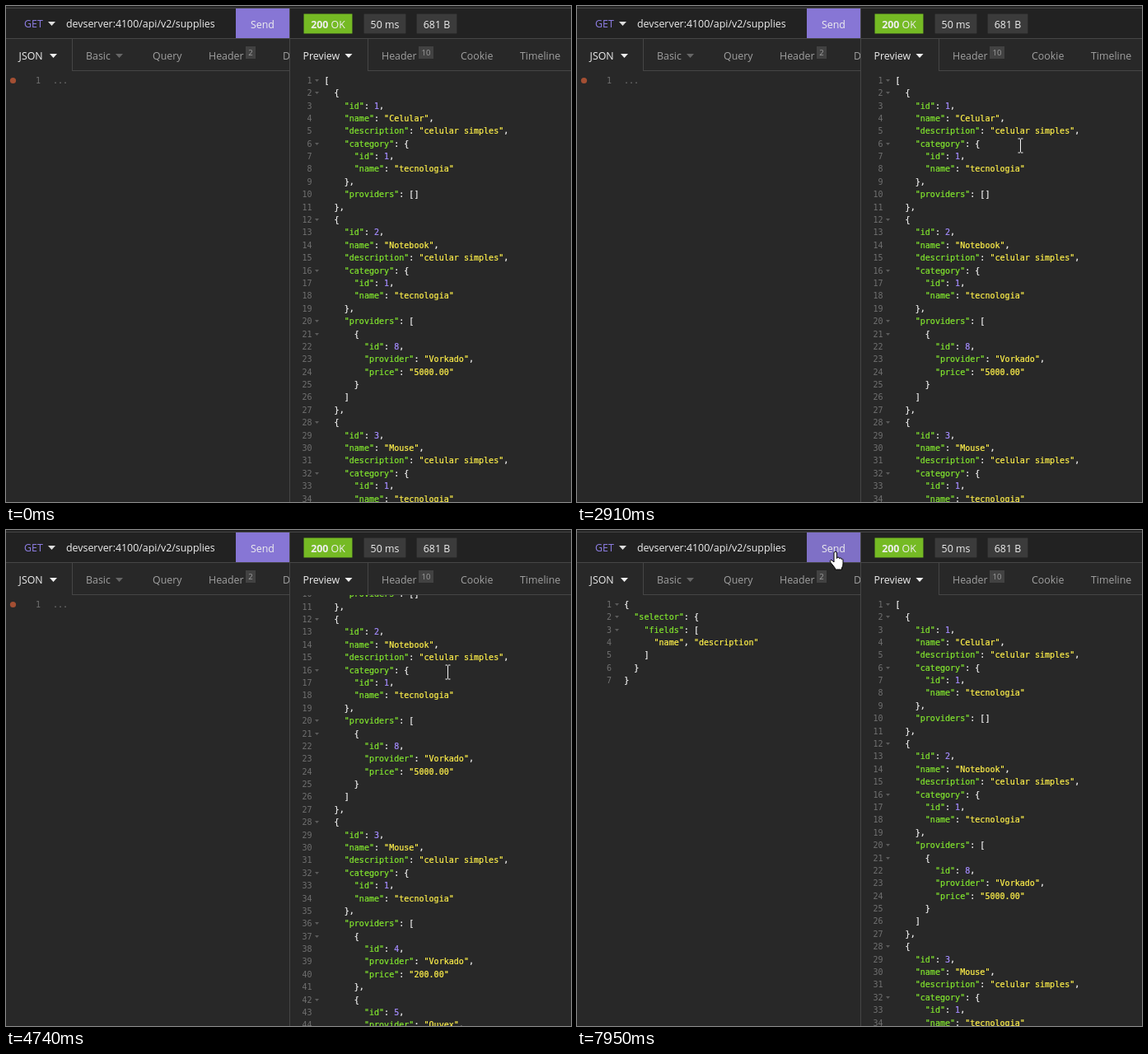
These frames come from a looping animation (686x602 px, 8000 ms). An HTML page:

```html
<!DOCTYPE html>
<html lang="en">
<head>
<meta charset="utf-8">
<style>
  html, body { margin: 0; width: 100%; height: 100%; overflow: hidden; background: #282828; }
  svg { display: block; width: 686px; height: 602px; }
  text { font: 12.4px "Open Sans", "Noto Sans", sans-serif; fill: #eee; white-space: pre; }
  .code { color: #f4f4f4; }
  .code text { font: 10.05px "DejaVu Sans Mono", monospace; fill: currentColor; }
  .code .src, .code tspan { fill: currentColor; stroke: currentColor; stroke-width: .22px; }
  .code .num { fill: #707070; text-anchor: end; }
  .fold { fill: #5c5c5c; }
  .key { color: #82e62e; }
  .str { color: #fff04a; }
  .val { color: #a48cff; }
  .dim { fill: #a0a0a0; }
  .mid { text-anchor: middle; }
  .line { fill: #464646; }
  .tag { fill: #3b3b3b; stroke: #000; stroke-opacity: .07; }
</style>
</head>
<body>
<svg viewBox="0 0 686 602">
  <defs>
    <clipPath id="body"><rect x="346" y="79" width="340" height="523"/></clipPath>
    <clipPath id="tabs"><rect x="81" y="40" width="263" height="38"/></clipPath>
  </defs>
  <rect width="686" height="602" fill="#282828"/>
  <rect width="686" height="39" fill="#222"/>
  <g class="line">
    <rect y="2" width="686" height="1"/>
    <rect y="39" width="686" height="1"/>
    <rect x="344" y="3" width="1" height="599"/>
    <rect x="80" y="40" width="1" height="38"/>
    <rect x="80" y="78" width="264" height="1"/>
    <rect x="439" y="40" width="1" height="38"/>
    <rect x="439" y="78" width="247" height="1"/>
  </g>

  <text x="22" y="26" style="fill:#8f7fe6">GET</text>
  <path d="M51 19h9l-4.5 5z" fill="#ddd"/>
  <text x="73" y="26">devserver:4100/api/v2/supplies</text>
  <rect id="send" x="279" y="3" width="65" height="36"/>
  <text x="311.5" y="27" class="mid">Send</text>

  <rect x="361.5" y="9.5" width="59" height="24" class="tag" style="fill:#75ba24"/>
  <text x="391" y="27" class="mid"><tspan font-weight="700">200</tspan> OK</text>
  <rect x="434.5" y="9.5" width="51" height="24" class="tag"/>
  <text x="460" y="27" class="mid">50 ms</text>
  <rect x="498.5" y="9.5" width="49" height="24" class="tag"/>
  <text x="523" y="27" class="mid">681 B</text>

  <text x="15.6" y="65">JSON</text>
  <path d="M53 58h9l-4.5 5z" fill="#eee"/>
  <g clip-path="url(#tabs)">
    <text x="97" y="65" class="dim">Basic</text>
    <path d="M133 58h9l-4.5 5z" fill="#666"/>
    <text x="178" y="65" class="dim">Query</text>
    <text x="246" y="65" class="dim">Header</text>
    <rect x="291" y="49" width="12" height="15" fill="#424242"/>
    <text x="297" y="60" class="mid dim" style="font-size:9.5px">2</text>
    <text x="336" y="65" class="dim">Docs</text>
  </g>
  <text x="360.5" y="65">Preview</text>
  <path d="M411.5 58h9l-4.5 5z" fill="#eee"/>
  <text x="456" y="65" class="dim">Header</text>
  <rect x="501" y="49" width="18" height="15" fill="#424242"/>
  <text x="510" y="60" class="mid dim" style="font-size:9.5px">10</text>
  <text x="552" y="65" class="dim">Cookie</text>
  <text x="624" y="65" class="dim">Timeline</text>

  <g class="code" id="empty">
    <circle cx="8.5" cy="90.5" r="3.6" fill="#a34f33"/>
    <text x="42" y="94" class="num">1</text>
    <text x="57" y="94" style="fill:#777">...</text>
  </g>
  <g class="code" id="query"></g>
  <g clip-path="url(#body)"><g class="code" id="reply"></g></g>

  <path id="beam" d="M-3-8.5h2.5M.5-8.5H3M0-8V8M-3 8.5h2.5M.5 8.5H3" fill="none" stroke="#f4f4f4"/>
  <path id="hand" fill="#fff" stroke="#000" stroke-linejoin="round"
    d="M-2 13V2q0-1.7 1.7-1.7T1.4 2V8.5Q1.6 7 3 7T4.6 8.7Q5 7.8 6 7.9T7.2 9.6Q7.5 8.9 8.3 9.1T9 11V15Q9 18 7.5 20V22H-.5V20.5Q-3 17-6 13.5Q-7.5 11-6 10.5Q-4.5 10-2 13Z"/>
</svg>
<script>
const $ = id => document.getElementById(id);

const product = (id, name, ...providers) => ({
  id, name, description: 'celular simples',
  category: { id: 1, name: 'tecnologia' }, providers
});
const offer = (id, provider, price) => ({ id, provider, price });

const reply = JSON.stringify([
  product(1, 'Celular'),
  product(2, 'Notebook', offer(8, 'Vorkado', '5000.00')),
  product(3, 'Mouse', offer(4, 'Vorkado', '200.00'), offer(5, 'Quvex', '100.00')),
  product(4, 'Teclado')
], null, 2);
const query = '{\n  "selector": {\n    "fields": [\n      "name", "description"\n    ]\n  }\n}';

const paint = s => s.replace(/("[^"]*")(?=:)|("[^"]*")|(\d+)/g, (m, key, str) =>
  `<tspan class="${key ? 'key' : str ? 'str' : 'val'}">${m}</tspan>`);

// Fills a group with numbered, coloured lines; x is the left edge of the code.
function listing(group, source, x, numX, foldX) {
  group.innerHTML = source.split('\n').map((line, i) => {
    const y = Math.floor(94.3 + 15.385 * i);
    const code = line.trimStart();
    const indent = (line.length - code.length) * 6.05;
    const fold = /[{[]$/.test(line) ? `<path class="fold" d="M${foldX} ${y - 5}h5l-2.5 3z"/>` : '';
    return `<text class="num" x="${numX}" y="${y}">${i + 1}</text>${fold}` +
      `<text class="src" x="${x + indent}" y="${y}">${paint(code)}</text>`;
  }).join('');
}
listing($('reply'), reply, 386.5, 371.5, 375);
listing($('query'), query, 57.2, 42, 46);

// Index of the current step in a run of n steps from a to b, -1 before it.
const step = (t, a, b, n) =>
  t < a ? -1 : Math.min(n - 1, Math.floor((t - a) / (b - a) * (n - 1) + 1e-6));

const BOTTOM = 261;
const DOWN = [.12, .555, .92, 1], UP = [.011, .42, .87, 1];
const flicks = [[2700, 2910, UP], [3110, 3330, DOWN], [3600, 3800, UP], [4200, 4410, DOWN], [4670, 4880, UP]];

function scrollAt(t) {
  const u = (step(t, 1480, 2220, 11) + 1) / 11;
  let pos = u * u * (3 - 2 * u);
  for (const [a, b, ease] of flicks) {
    const k = step(t, a, b, 4);
    if (k >= 0) pos = ease === UP ? 1 - ease[k] : ease[k];
  }
  return Math.round(pos * BOTTOM);
}

const mix = (a, b, u) => a.map((v, i) => v + (b[i] - v) * u);
const curve = (a, c, b, u) => mix(mix(a, c, u), mix(c, b, u), u);

function pointerAt(t) {
  if (t < 610 || t >= 6170 && t < 6760) return null;
  if (t < 1480) return curve([587, 507], [442, 360], [530, 205], step(t, 610, 1350, 11) / 10);
  if (t < 3600) return mix([530, 205], [538, 169], (step(t, 1480, 2220, 11) + 1) / 11);
  if (t < 4200) return [536, 171];
  if (t < 5610) return [536, 172];
  if (t < 6170) return mix([540, 183], [702, 617], step(t, 5610, 6170, 9) / 8);
  if (t < 7600) return curve([557, 598], [420, 230], [278, 60], step(t, 6760, 7530, 11) / 10);
  return mix([278, 60], [314, 26], (step(t, 7600, 7950, 6) + 1) / 6);
}

function draw(now) {
  const t = now % 8000;
  $('reply').setAttribute('transform', `translate(0 ${-scrollAt(t)})`);
  $('empty').style.display = t < 6500 ? '' : 'none';
  $('query').style.display = t < 6500 ? 'none' : '';

  const p = pointerAt(t);
  const [x, y] = p ? p.map(Math.round) : [-50, -50];
  const onTop = y < 80;
  $('beam').style.display = p && !onTop ? '' : 'none';
  $('hand').style.display = p && onTop ? '' : 'none';
  $('beam').setAttribute('transform', `translate(${x + .5} ${y + .5})`);
  $('hand').setAttribute('transform', `translate(${x} ${y})`);
  $('send').setAttribute('fill', p && x > 279 && y < 39 ? '#7f70c6' : '#8776d5');
}

const start = performance.now();
function loop() {
  draw(performance.now() - start);
  requestAnimationFrame(loop);
}
loop();
</script>
</body>
</html>
```
